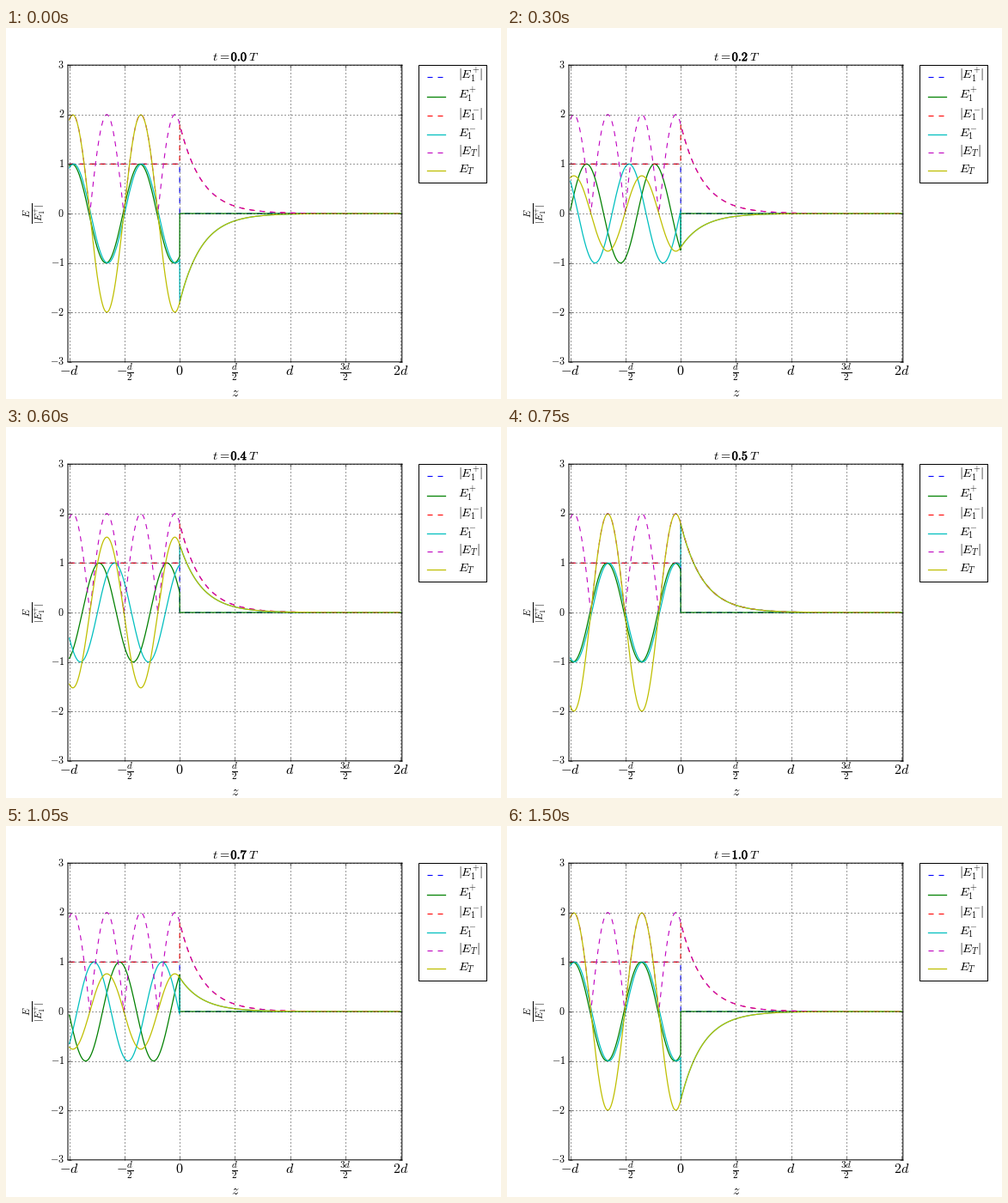
Write a matplotlib script that moves like this. It is 576 by 432 pixels and loops after 1650 ms.

```python
import numpy as np
import matplotlib.pyplot as plt
from matplotlib.animation import FuncAnimation
from matplotlib.lines import Line2D
from matplotlib.patches import Rectangle
from matplotlib.patheffects import withStroke

plt.style.use("classic")
plt.rcParams.update({"savefig.dpi": "figure", "font.family": "DejaVu Sans"})

WIDTH, HEIGHT, DPI = 576, 432, 72
FRAMES, INTERVAL = 11, 150

# Total reflection at z = 0; lengths are in units of d
K, ALPHA = 10.2, 5.0
THETA = np.arctan2(ALPHA, K)
PHASE = np.radians(175.6) - THETA

z = np.linspace(-1, 2, 3001)
left = z < 0
decay = 2 * np.cos(THETA) * np.exp(-ALPHA * np.maximum(z, 0))
standing = 2 * np.cos(K * z + THETA)

STYLES = [
    ("b--", r"$|E_1^{+}|$"), ("g-", r"$E_1^{+}$"),
    ("r--", r"$|E_1^{-}|$"), ("c-", r"$E_1^{-}$"),
    ("m--", r"$|E_T|$"), ("y-", r"$E_T$"),
]


def fields(t):
    """Curves in legend order at time t, in periods."""
    phase = 2 * np.pi * t + PHASE
    swing = np.cos(phase + THETA)
    forward = np.where(left, np.cos(phase - K * z), 0)
    backward = np.where(left, np.cos(phase + K * z + 2 * THETA), decay * swing)
    envelope = np.where(left, standing, decay)
    return [np.where(left, 1, 0), forward, np.where(left, 1, decay), backward,
            np.abs(envelope), envelope * swing]


def line_format(style):
    dashed = style.endswith("--")
    return {"color": style[0], "ls": style[1:], "lw": 1.1 if dashed else 1.25}


fig = plt.figure(figsize=(WIDTH / DPI, HEIGHT / DPI), dpi=DPI, facecolor="w")
ax = fig.add_axes([0.125, 0.1, 0.675, 0.8])
ax.set_xlim(-1.0135, 2.0135)
ax.set_ylim(-3, 3)
ax.set_xticks(np.arange(-2, 5) / 2)
ax.set_xticklabels(
    [r"$-d$", r"$-\frac{d}{2}$", r"$0$", r"$\frac{d}{2}$", r"$d$",
     r"$\frac{3d}{2}$", r"$2d$"], fontsize=16, va="baseline")
ax.tick_params(axis="x", pad=15.6)
ax.set_yticks(range(-3, 4))
ax.set_yticklabels([f"${n}$" for n in range(-3, 4)], fontsize=12)
ax.grid(True, lw=0.8)
for spine in ax.spines.values():
    spine.set_snap(False)
lines = [ax.plot(z, curve, **line_format(style))[0]
         for curve, (style, _) in zip(fields(0), STYLES)]


def pixel_text(x, y, text, size, va="baseline", **kwargs):
    return fig.text(x / WIDTH, 1 - y / HEIGHT, text, fontsize=size, va=va,
                    **kwargs)


def pixel_line(x0, x1, y, style):
    fig.add_artist(Line2D([x0 / WIDTH, x1 / WIDTH], [1 - y / HEIGHT] * 2,
                          **line_format(style)))


pixel_text(266.5, 429, r"$z$", 16, ha="center")
pixel_text(33.5, 216, r"$\frac{E}{|E_1^{+}|}$", 16, va="center", rotation=90,
           ha="center")

# Title, with the time in heavy digits
pixel_text(260.8, 38.2, r"$t\hspace{0.08}=\hspace{-0.2}$", 14.4, ha="right")
clock = pixel_text(271.4, 38.2, "", 14.4, ha="center",
                   path_effects=[withStroke(linewidth=0.5, foreground="k")])
pixel_text(282, 38.2, r"$T$", 14.4, ha="left")

# Legend
fig.add_artist(Rectangle((480.24 / WIDTH, 1 - 179.6 / HEIGHT), 79.2 / WIDTH,
                         136.4 / HEIGHT, fc="w", ec="k", lw=1))
for (style, label), y in zip(STYLES, [57, 80, 102, 124, 145, 166]):
    pixel_line(490, 511, y, style)
    pixel_text(526, y + 2.5, label, 14.4, ha="left")


def update(i):
    t = i / 10
    for line, curve in zip(lines, fields(t)):
        line.set_ydata(curve)
    clock.set_text(rf"$\mathbf{{{t:.1f}}}$")
    return [*lines, clock]


anim = FuncAnimation(fig, update, frames=FRAMES, interval=INTERVAL,
                     repeat=True, repeat_delay=0)
plt.show()
```
